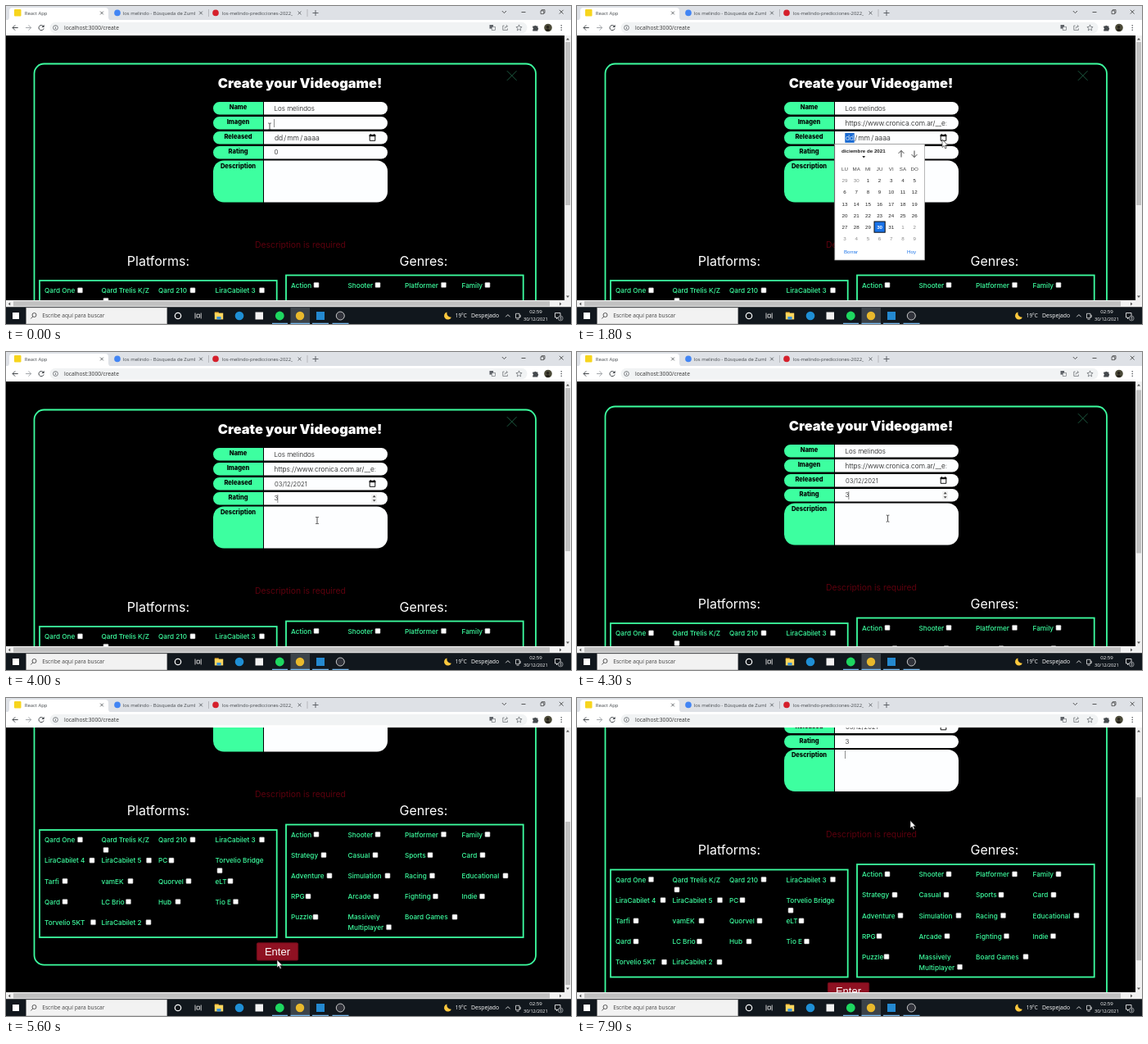
An HTML page for the animation above (8000 ms loop, 690 by 388 pixels).

```html
<!DOCTYPE html>
<html lang="es">
<head>
<meta charset="utf-8">
<title>Create</title>
<style>
html, body { margin: 0; width: 100%; height: 100%; overflow: hidden; background: #000; }
svg { display: block; width: 690px; height: 388px; }
text { white-space: pre; }
</style>
</head>
<body>
<svg id="stage" viewBox="0 0 690 388" xmlns="http://www.w3.org/2000/svg"></svg>
<script>
const LOOP = 8000;
const GREEN = '#3dffa0';
const POP = 'Inter, sans-serif';
const UI = "'Open Sans', sans-serif";
const ARIAL = "'Liberation Sans', sans-serif";

// Markup helpers; text is placed by its vertical centre.
const txt = (x, y, s, size, o = {}) =>
  `<text x="${x}" y="${(y + size * 0.36).toFixed(2)}" font-size="${size}" font-family="${o.font || POP}"` +
  ` font-weight="${o.w || 400}" fill="${o.fill || '#000'}" text-anchor="${o.a || 'start'}"` +
  `${o.extra || ''}>${s}</text>`;
const rect = (x, y, w, h, fill, extra = '') =>
  `<rect x="${x}" y="${y}" width="${w}" height="${h}" fill="${fill}" ${extra}/>`;
const disc = (x, y, r, fill, extra = '') => `<circle cx="${x}" cy="${y}" r="${r}" fill="${fill}" ${extra}/>`;
const line = (d, stroke, w = 1, extra = '') =>
  `<path d="${d}" fill="none" stroke="${stroke}" stroke-width="${w}" ${extra}/>`;
const fill = (d, c, extra = '') => `<path d="${d}" fill="${c}" ${extra}/>`;
const group = (id, body, extra = '') => `<g id="${id}" ${extra}>${body}</g>`;
const cross = (x, y, r, c, w) =>
  line(`M${x - r} ${y - r}L${x + r} ${y + r}M${x + r} ${y - r}L${x - r} ${y + r}`, c, w);

// ---- Form ----
function formRow(label, y, h, r) {
  const left = `M314 ${y}H${253 + r}a${r} ${r} 0 0 0 ${-r} ${r}V${y + h - r}a${r} ${r} 0 0 0 ${r} ${r}H314Z`;
  const right = `M315 ${y}H${466 - r}a${r} ${r} 0 0 1 ${r} ${r}V${y + h - r}a${r} ${r} 0 0 1 ${-r} ${r}H315Z`;
  return fill(left, GREEN) + fill(right, '#fdfeff') +
    txt(283.5, y + 6.6, label, 7.5, { w: 800, a: 'middle' });
}

function dateIcon() {
  return line('M444.2 157.5h6.6v6.8h-6.6Z', '#111', 1) + rect(443.7, 156.8, 7.6, 2.4, '#111') +
    rect(444.8, 156, 1, 1.2, '#111') + rect(449.2, 156, 1, 1.2, '#111');
}

function form() {
  const input = { w: 300, fill: '#111' };
  const spin = rect(446.2, 173.8, 6.8, 9.8, '#efefef') +
    fill('M447.8 177.2h3.8l-1.9-2.4ZM447.8 180.2h3.8l-1.9 2.4Z', '#444');
  return formRow('Name', 117, 15.5, 7.7) + formRow('Imagen', 135, 15.5, 7.7) +
    formRow('Released', 153, 15.5, 7.7) + formRow('Rating', 171, 15.5, 7.7) +
    formRow('Description', 188.5, 51, 13) +
    txt(327.5, 125.2, 'Los melindos', 8, input) +
    group('url', txt(327.5, 142.8, 'https://www.cronica.com.ar/__e:', 8.35, input), 'clip-path="url(#field)"') +
    group('empty', rect(327.3, 155, 11.4, 11.8, '#1769d2', 'id="pick"') +
      txt(328, 161, 'dd', 8.5, { ...input, extra: ' id="dd"' }) +
      txt(339.3, 161, '/', 8.5, input) + txt(343.2, 161, 'mm', 8.5, input) +
      txt(359.3, 161, '/', 8.5, input) + txt(363.4, 161, 'aaaa', 8.9, input)) +
    group('date', txt(328, 161, '03/12/2021', 7.7, input)) +
    dateIcon() + group('spin', spin) +
    txt(327.5, 178.6, '0', 8, { ...input, extra: ' id="rating"' }) +
    rect(327, 138, 0.6, 10, '#444', 'id="caret"');
}

// ---- Check lists: [label, box centre x], '|' starts a second line ----
const platforms = [
  ['Qard One', 90.5], ['Qard Trelis K/Z|', 122], ['Qard 210', 228], ['LiraCabilet 3', 312.5],
  ['LiraCabilet 4', 105], ['LiraCabilet 5', 174.5], ['PC', 202], ['Torvelio Bridge|', 261],
  ['Tarfi', 72], ['vamEK', 152], ['Quorvel', 223], ['eLT', 274],
  ['Qard', 72], ['LC Brio', 149.5], ['Hub', 210], ['Tio E', 280.5],
  ['Torvelio 5KT', 106.5], ['LiraCabilet 2', 174]
];
const genres = [
  ['Action', 379], ['Shooter', 454], ['Platformer', 534.5], ['Family', 588],
  ['Strategy', 388], ['Casual', 451], ['Sports', 518], ['Card', 582],
  ['Adventure', 395], ['Simulation', 466], ['Racing', 520.5], ['Educational', 610],
  ['RPG', 369], ['Arcade', 452], ['Fighting', 524.5], ['Indie', 581.5],
  ['Puzzle', 378], ['Massively|Multiplayer', 467.5], ['Board Games', 548]
];

function checks(items, x0, y0) {
  return items.map(([label, bx], i) => {
    const x = x0 + (i % 4) * 69.5, y = y0 + Math.floor(i / 4) * 25.2;
    const rows = label.split('|');
    const by = y + (rows.length - 1) * 12.5 - 0.3;
    return rows.map((s, k) => txt(x, y + k * 12.7, s, 8.2, { w: 500, fill: GREEN })).join('') +
      rect(bx - 3.1, by - 3.1, 6.2, 6.2, '#fff', 'rx="1" stroke="#777" stroke-width=".5"');
  }).join('');
}

function page() {
  const frame = (x, y, w, h, r) => rect(x, y, w, h, 'none', `rx="${r}" stroke="${GREEN}" stroke-width="1.8"`);
  return frame(34.5, 70.5, 612.5, 429.2, 12) + cross(617.7, 85, 5.8, '#1d5a40', 1) +
    txt(359, 94.5, 'Create your Videogame!', 16.4, { w: 900, a: 'middle', fill: '#fff' }) +
    form() +
    txt(359.5, 291.3, 'Description is required', 10.4, { a: 'middle', fill: '#5c000d' }) +
    txt(186, 311, 'Platforms:', 16, { a: 'middle', fill: '#fff' }) +
    txt(510, 311, 'Genres:', 16, { a: 'middle', fill: '#fff' }) +
    frame(41, 335, 289.7, 131, 0) + frame(342, 328.5, 289.7, 137.5, 0) +
    checks(platforms, 47, 347.2) + checks(genres, 348, 340.7) +
    rect(306.3, 472.8, 50.4, 21.2, '#8f1122', 'rx="1.5" stroke="#6b0b18" stroke-width="1"') +
    txt(331.5, 483, 'Enter', 13, { font: ARIAL, a: 'middle', fill: '#fff' });
}

// ---- Date popup ----
function calendar() {
  const small = (x, y, s, c, w = 400) => txt(x, y, s, 6.2, { font: ARIAL, a: 'middle', fill: c, w });
  const col = i => 327 + i * 14.2;
  let s = rect(314.8, 168.5, 109.8, 141.5, '#fff', 'stroke="#999" stroke-width=".7"') +
    txt(323, 177.2, 'diciembre de 2021', 6.2, { font: ARIAL, w: 700, fill: '#222' }) +
    fill('M348.3 183h3.8l-1.9 2.4Z', '#222') +
    line('M396 184.5v-8m-3.4 3.4l3.4-3.5l3.4 3.5M412 176.5v8m-3.4-3.4l3.4 3.5l3.4-3.5', '#333', 0.9);
  ['LU', 'MA', 'MI', 'JU', 'VI', 'SA', 'DO'].forEach((d, i) => { s += small(col(i), 198.3, d, '#444'); });
  for (let i = 0; i < 42; i++) {
    const n = i < 2 ? 29 + i : (i - 2) % 31 + 1;
    const x = col(i % 7), y = 213 + Math.floor(i / 7) * 14.15;
    const inside = i > 1 && i < 33, today = i === 31;
    if (today) s += rect(x - 6.6, y - 6.6, 13.2, 13.2, '#1a73e8', 'stroke="#101010" stroke-width="1"');
    s += small(x, y, n, today ? '#fff' : inside ? '#222' : '#888', today ? 700 : 400);
  }
  return s + small(334.5, 299.5, 'Borrar', '#1a73e8') + small(408.5, 299.5, 'Hoy', '#1a73e8');
}

// ---- Browser frame ----
function browser() {
  const ink = '#5f6368', tab = { font: UI, fill: '#45494d' };
  return rect(0, 0, 690, 18, '#dee1e6') + rect(0, 17, 690, 19, '#fff') +
    fill('M0 17.5q4 0 4-4V6q0-4 4-4H121q4 0 4 4v7.5q0 4 4 4Z', '#fff') +
    rect(10, 4, 8.5, 8.5, '#f7d51d', 'rx="1"') + disc(136, 8.4, 3.8, '#4285f4') + disc(256, 8.4, 3.8, '#d5202c') +
    txt(22.8, 8.5, 'React App', 5.9, tab) +
    group('t2', txt(142.8, 8.5, 'los melindo - Búsqueda de Zumbe', 5.9, tab), 'clip-path="url(#tab2)"') +
    group('t3', txt(263.8, 8.5, 'los-melindo-predicciones-2022_n', 5.9, tab), 'clip-path="url(#tab3)"') +
    [117, 238, 358.5].map(x => cross(x, 8.5, 1.9, '#45494d', 0.8)).join('') +
    line('M247.5 4v9M368 4v9', '#9a9da2', 0.6) + line('M374.5 8.5h7M378 5v7', ink, 1) +
    line('M605.8 6l2.6 2.6l2.6-2.6M629.5 7.5h5', '#333', 0.8) +
    line('M653 5.8h3.8v3.8h-3.8ZM654.2 5.8v-1.2h3.8v3.8h-1.2', '#333', 0.7) + cross(678.2, 7.2, 2.4, '#333', 0.8) +
    // toolbar
    line('M14.7 26.5H8m3.2-3.2L8 26.5l3.2 3.2', '#45494d', 1) +
    line('M24 26.5h6.7m-3.2-3.2l3.2 3.2l-3.2 3.2', '#a5a8ac', 1) +
    line('M45.8 25a3.1 3.1 0 1 0 .3 2.4', '#45494d', 1) + fill('M46.6 22.8v3.2h-3.2Z', '#45494d') +
    rect(53.5, 19.8, 583, 13.4, '#f1f3f4', 'rx="6.7"') +
    disc(60.5, 26.5, 2.9, 'none', `stroke="${ink}" stroke-width=".8"`) + line('M60.5 26v2M60.5 24.7v.7', ink, 0.8) +
    txt(71, 26.5, 'localhost:3000/create', 6.7, { font: UI, fill: '#333' }) +
    rect(590.5, 23, 4.6, 4.6, ink) + rect(593.2, 25.4, 4.2, 4.2, '#f1f3f4', `stroke="${ink}" stroke-width=".6"`) +
    line('M608.5 24h-1.7v5.4h5.6v-2M609 27.5q.3-2.8 3.2-2.8m-1.3-1.6l1.6 1.6l-1.6 1.6', ink, 0.7) +
    line('M626.5 22.9l1 2.5l2.6.2l-2 1.7l.6 2.6l-2.2-1.4l-2.2 1.4l.6-2.6l-2-1.7l2.6-.2Z', ink, 0.7) +
    fill('M643.2 24.6h1.9a1.3 1.3 0 0 1 2.5 0h1.8v1.9a1.3 1.3 0 0 1 0 2.4v1.5h-6.2v-1.7a1.2 1.2 0 0 0 0-2.2Z', '#45494d') +
    disc(662, 26.5, 4.8, '#4b4a38') + disc(661.6, 25.6, 1.7, '#26221c') + fill('M658.8 29.6q2.8-4 5.6 0q-2.8 2.6-5.6 0Z', '#26221c') +
    [23.8, 26.5, 29.2].map(y => disc(678.2, y, 0.75, '#45494d')).join('');
}

function bars() {
  return rect(682, 36, 8, 331, '#f1f1f1') + rect(0, 359, 690, 8.5, '#f1f1f1') +
    fill('M684 41.5h4l-2-2.4ZM684 353.5h4l-2 2.4ZM5.2 361.4v4l-2.4-2ZM676 361.4v4l2.4-2Z', '#555') +
    rect(9, 360.2, 655, 6.2, '#c1c1c1') + rect(683, 44, 6, 199, '#c1c1c1', 'id="thumb"');
}

// ---- Taskbar ----
function taskbar() {
  const white = { font: UI, fill: '#fff' };
  return rect(0, 367.5, 690, 20.5, '#11171d') + rect(8, 374, 8, 8, '#fff') +
    rect(24.5, 368, 172.3, 20, '#f2f2f2', 'stroke="#777" stroke-width=".5"') +
    disc(34.5, 377, 2.5, 'none', 'stroke="#333" stroke-width=".8"') + line('M32.7 379l-2.4 2.5', '#333', 0.8) +
    txt(44.2, 378, 'Escribe aquí para buscar', 6.7, { font: UI, fill: '#444' }) +
    disc(210, 378, 3.7, 'none', 'stroke="#fff" stroke-width="1.2"') +
    line('M231 374.5v7M233 376.2h3.4v3.8h-3.4ZM238.2 374.5v7', '#ddd', 0.9) +
    rect(254.8, 373.4, 5, 3, '#e8a82a') + rect(254.8, 374.6, 10.4, 7.8, '#ffd75e') + rect(257.4, 379, 5.2, 3.4, '#3b93d8') +
    disc(285, 378, 5.3, '#1f8fd5') + rect(304.5, 373.5, 9.5, 9, '#f2f2f2') +
    disc(334.3, 378, 5.4, '#1ed760') +
    rect(347.5, 367.5, 23.5, 20.5, '#3c4349') + disc(359, 378, 5.2, '#e9b92c') +
    rect(379, 373, 10, 10, '#2489d0') + disc(408.3, 378, 5, '#30323a', 'stroke="#d8d8d8" stroke-width=".9"') +
    line('M325 387.3h19M347.5 387.3h23.5M374 387.3h20M398.5 387.3h20', '#76b9ed', 1.2) +
    fill('M538.5 373.5a4.6 4.6 0 1 0 5.4 6.2a5 5 0 0 1-5.4-6.2Z', '#ffc83d') +
    txt(548.8, 378, '19°C', 6.4, white) + txt(568, 378, 'Despejado', 6.9, white) +
    line('M610.2 379.3l2.7-2.7l2.7 2.7', '#fff', 0.8) +
    line('M622.5 375.3h4.5v5.4h-4.5ZM627 377.2h1.3v2.3H627M623.5 382.2h3', '#fff', 0.7) +
    txt(647, 373.2, '02:59', 6.1, { ...white, a: 'middle' }) + txt(646.8, 382, '30/12/2021', 5.6, { ...white, a: 'middle' }) +
    line('M670.5 374.5h6.5v5.5h-3l-1.5 1.7v-1.7h-2Z', '#fff', 0.8) +
    disc(677.2, 381, 3, '#33393f', 'stroke="#fff" stroke-width=".4"') +
    txt(677.2, 381, '1', 4.4, { ...white, a: 'middle' });
}

const pointers =
  group('arrow', fill('M0 0V9.5l2.2-2l1.5 3.4l1.6-.7l-1.5-3.3h3Z', '#fff', 'stroke="#111" stroke-width=".6"')) +
  group('beam', line('M-1.8-4h1.3l.5.5l.5-.5h1.3M0-3.5v7M-1.8 4h1.3l.5-.5l.5.5h1.3', '#222', 0.8));

const clip = (id, x, y, w, h) => `<clipPath id="${id}">${rect(x, y, w, h, '#000')}</clipPath>`;
const stage = document.getElementById('stage');
stage.innerHTML = '<defs>' + clip('view', 0, 36, 682, 323) + clip('field', 327, 134, 127, 17) +
  clip('tab2', 142, 2, 89, 14) + clip('tab3', 263, 2, 87, 14) + '</defs>' +
  rect(0, 0, 690, 388, '#000') + group('clip', group('page', page()), 'clip-path="url(#view)"') +
  bars() + browser() + taskbar() + group('cal', calendar()) + group('mouse', pointers);

const el = {};
stage.querySelectorAll('[id]').forEach(n => { el[n.id] = n; });
const set = (n, o) => { for (const k in o) n.setAttribute(k, o[k]); };
const show = (n, on) => set(n, { visibility: on ? 'visible' : 'hidden' });

// ---- Motion: [time, values...] eased between stops ----
const PASTE = 400, OPEN = 1600, CLOSE = 2700, FOCUS = 3600, TYPE = 3900, WRITE = 7480;
const mousePath = [
  [0, 322, 147], [500, 330, 146], [900, 345, 146], [1500, 446, 163], [1900, 446, 163], [2400, 384, 212],
  [2800, 384, 212], [3200, 366, 184], [3550, 345, 179], [3750, 348, 180], [4000, 380, 205.5],
  [4200, 380, 205.5], [4800, 374, 173.5], [5000, 374, 173.5], [5600, 331, 319.5], [6100, 331, 319.5],
  [6850, 367, 187], [7000, 367, 187], [7400, 390, 92], [7550, 390, 92], [7900, 407, 149.5]
];
const scrollPath = [[4250, 0], [4550, 54], [4900, 119], [5050, 119], [5400, 174], [6865, 174], [7265, 125.5]];

function at(path, t) {
  const last = path[path.length - 1];
  if (t <= path[0][0]) return path[0].slice(1);
  if (t >= last[0]) return last.slice(1);
  const i = path.findIndex(p => p[0] > t);
  const a = path[i - 1], b = path[i];
  const u = (t - a[0]) / (b[0] - a[0]), e = u * u * (3 - 2 * u);
  return a.slice(1).map((v, k) => v + (b[k + 1] - v) * e);
}

function draw(t) {
  const [scroll] = at(scrollPath, t);
  const [mx, my] = at(mousePath, t);
  const open = t >= OPEN && t < CLOSE;
  set(el.page, { transform: `translate(0 ${-scroll.toFixed(2)})` });
  set(el.thumb, { y: (44 + scroll * 0.615).toFixed(2) });

  show(el.url, t >= PASTE);
  show(el.empty, t < CLOSE);
  set(el.pick, { opacity: open ? 1 : 0 });
  set(el.dd, { fill: open ? '#fff' : '#111' });
  show(el.date, t >= CLOSE);
  show(el.cal, open);
  show(el.spin, t >= FOCUS && t < WRITE);
  el.rating.textContent = t < TYPE ? '0' : '3';

  let since = -1, x = 327, y = 138;
  if (t < PASTE) since = t;
  else if (t >= WRITE) { since = t - WRITE; y = 189.5; }
  else if (t >= FOCUS) { since = t - (t < TYPE ? FOCUS : TYPE); x = 331.6; y = 174; }
  set(el.caret, { x, y });
  show(el.caret, since >= 0 && since % 1000 < 500);

  const py = my + scroll;
  const text = !open && mx > 315 && mx < 440 && py > 117 && py < 239;
  set(el.mouse, { transform: `translate(${mx.toFixed(2)} ${my.toFixed(2)})` });
  show(el.beam, text);
  show(el.arrow, !text);
}

let start = null;
function tick(now) {
  if (start === null) start = now;
  draw((now - start) % LOOP);
  requestAnimationFrame(tick);
}
draw(0);
requestAnimationFrame(tick);
</script>
</body>
</html>
```
